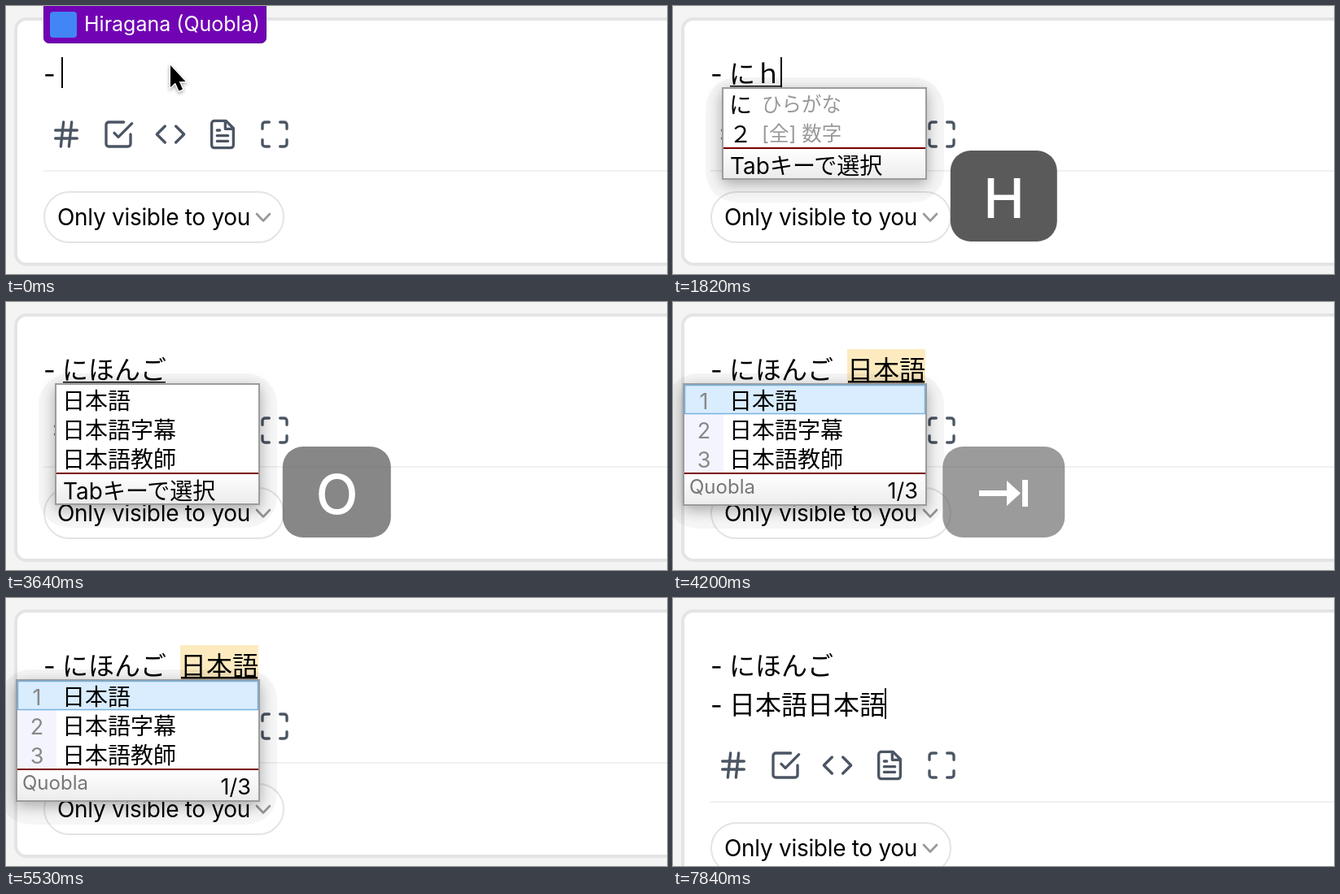
These frames come from a looping animation (812x330 px, 8000 ms). An HTML page:

```html
<!DOCTYPE html>
<html lang="ja">
<head>
<meta charset="utf-8">
<title>Kana input</title>
<style>
html, body { margin: 0; width: 100%; height: 100%; overflow: hidden; background: #f4f4f4; }
svg { display: block; width: 812px; height: 330px; }
text { font-family: Inter, 'Noto Sans CJK JP', 'Noto Sans CJK', sans-serif; }
.icons { fill: none; stroke: #4b5563; stroke-width: 2; stroke-linecap: round; stroke-linejoin: round; }
.popup { filter: drop-shadow(0 5px 9px rgba(0, 0, 0, .32)); }
.glyph { fill: none; stroke: #fff; stroke-width: 7; stroke-linejoin: round; }
</style>
</head>
<body>
<svg id="stage" viewBox="0 0 812 330">
  <defs>
    <linearGradient id="foot" x2="0" y2="1">
      <stop offset="0" stop-color="#fff"/><stop offset="1" stop-color="#ececec"/>
    </linearGradient>
  </defs>
  <rect width="812" height="330" fill="#f4f4f4"/>
  <rect id="card" x="12" y="16" width="900" height="302" rx="13" fill="#fff" stroke="#e4e4e7" stroke-width="4"/>
  <g id="lower">
    <g id="tools" class="icons"></g>
    <path d="M46 203H812" stroke="#f0f0f1" stroke-width="2"/>
    <rect x="47" y="229" width="294" height="62" rx="31" fill="#fff" stroke="#e4e4e7" stroke-width="2"/>
    <text x="63" y="270" font-size="28" letter-spacing="-.3">Only visible to you</text>
    <path d="M308 256l8 8.500 8-8.500" fill="none" stroke="#999" stroke-width="2.600" stroke-linecap="round" stroke-linejoin="round"/>
  </g>
  <g id="live"></g>
</svg>
<script>
const LOOP = 8000, TICK = 70, LINE = 48;
const CONVERT = 4200, COMMIT = 5740;

// [time, key, key width, composed text, suggestions]
const japan = ['日本', '日本語', '日本人'];
const language = ['日本語', '日本語字幕', '日本語教師'];
const two = [['に', 'ひらがな'], ['２', '[全] 数字']];
const strokes = [
  [1190, 'N', 132, 'ｎ', ['の', 'な', 'に']],
  [1470, 'I', 112, 'に', two],
  [1820, 'H', 131, 'にｈ', two],
  [1960, 'O', 133, 'にほ', japan],
  [2100, 'N', 132, 'にほｎ', japan],
  [2240, 'N', 132, 'にほん', japan],
  [2380, 'G', 131, 'にほんｇ', language],
  [2520, 'O', 133, 'にほんご', language],
  [CONVERT, 'tab', 150, 'にほんご', language],
  [COMMIT, 'enter', 154, '', []]
];

// Spans [from, to) when the caret is off
const caretOff = [[280, 770], [3150, 3710], [CONVERT, COMMIT], [6300, 6790], [7350, 7840]];

// Key overlay fades: [start, opacity per tick]
const fades = [
  [1190, [.6]], [CONVERT, [.6]], [COMMIT, [.6]],
  [3640, [.72, .46, .2, 0]], [5180, [.72, .46, .2, 0]], [6790, [.6, .25, 0]]
];
const keyHidden = [[0, 1190], [3850, CONVERT], [5390, COMMIT], [6930, LOOP]];

const icons = [
  'M4 9H20M4 15H20M10 3L8 21M16 3L14 21',
  'M9 11l3 3L22 4M21 12v7a2 2 0 0 1-2 2H5a2 2 0 0 1-2-2V5a2 2 0 0 1 2-2h11',
  'M16 18l6-6-6-6M8 6l-6 6 6 6',
  'M14.500 2H6a2 2 0 0 0-2 2v16a2 2 0 0 0 2 2h12a2 2 0 0 0 2-2V7.500ZM14 2v6h6M16 13H8M16 17H8M10 9H8',
  'M8 3H5a2 2 0 0 0-2 2v3M21 8V5a2 2 0 0 0-2-2h-3M3 16v3a2 2 0 0 0 2 2h3M16 21h3a2 2 0 0 0 2-2v-3'
];

const $ = id => document.getElementById(id);
const within = (t, spans) => spans.some(([a, b]) => t >= a && t < b);
const text = (x, y, size, str, attrs = '') =>
  `<text x="${x}" y="${y}" font-size="${size}" ${attrs}>${str}</text>`;
const rect = (x, y, w, h, fill, attrs = '') =>
  `<rect x="${x}" y="${y}" width="${w}" height="${h}" fill="${fill}" ${attrs}/>`;

$('tools').innerHTML = icons.map((d, i) =>
  `<path d="${d}" transform="translate(${54 + 64 * i} 138) scale(1.667)"/>`).join('');

function badge(t) {
  if (t >= 1190) return '';
  const alpha = Math.min(1, Math.max(.04, 1 - (t - 700) / 365));
  return `<g opacity="${alpha}">` +
    rect(46.5, -10, 273, 55.5, '#7103b4', 'rx="6" stroke="#5c0096"') +
    rect(54, 7, 33, 32, '#4285f4', 'rx="4"') +
    text(96, 31, 25, 'Hiragana (Quobla)', 'fill="#fff"') + '</g>';
}

function pointer() {
  return `<path d="M202 73V100L208 94.500L212.500 104.500L217 102.500L212.800 93H220.500Z" stroke="#fff"
    stroke-width="2.500" paint-order="stroke" style="filter:drop-shadow(0 2px 2px rgba(0,0,0,.35))"/>`;
}

function popup(rows, picking) {
  if (!rows.length) return '';
  const x = picking ? 12 : 60, w = 312 - x;
  const rule = 103 + 36 * rows.length, h = rule + (picking ? 40 : 39) - 100;
  let s = rect(x - 20, 88, w + 41, h + 40, '#000', 'rx="38" opacity=".035"');
  s += '<g class="popup">' + rect(x + 1, 101, w - 2, h - 2, '#fff', 'stroke="#9c9c9c" stroke-width="2"') + '</g>';
  s += rect(x + 2, rule, w - 4, h - rule + 98, 'url(#foot)');
  if (picking) {
    s += rect(14, 102, 48, rule - 102, '#f4f4ff');
    s += rect(14.5, 102.5, 295, 35, '#d9edff', 'stroke="#78b0dc" stroke-width="1.500"');
  }
  rows.forEach((row, i) => {
    const [word, note] = [].concat(row), y = 132 + 36 * i;
    s += text(69, y, 28, word);
    if (note) s += text(109, y - 2, 24.5, note, 'fill="#999"');
    if (picking) s += text(38, y, 27, i + 1, 'fill="#888" text-anchor="middle"');
  });
  s += rect(x + 2, rule - 1, w - 4, 2, '#7a0000');
  return s + (picking
    ? text(20, rule + 25, 24, 'Quobla', 'fill="#777"') + text(301, rule + 31, 27, '1/3', 'text-anchor="end"')
    : text(70, rule + 32, 28, 'Tabキーで選択'));
}

function keycap(t, key, w) {
  if (within(t, keyHidden)) return '';
  let alpha = 1;
  for (const [start, steps] of fades) {
    const a = steps[Math.round((t - start) / TICK)];
    if (a !== undefined) alpha = a;
  }
  const face = {
    tab: '<path class="glyph" d="M376 235.500H414M432.500 219V252"/><path fill="#fff" d="M410 220L427 235.500L410 251Z"/>',
    enter: '<path class="glyph" stroke-linecap="round" d="M408 212.500H425Q432 212.500 432 219.500V234.500Q432 241.500 425 241.500H380M395 226L379 241.500L395 257"/>'
  }[key] || text(406.5, 261, 68, key, 'fill="#fff" font-weight="500" text-anchor="middle"');
  return `<g opacity="${alpha}">` + rect(406.3 - w / 2, 178, w, 112, '#5a5a5a', 'rx="25"') + face + '</g>';
}

function editor(t, composed) {
  const done = t >= COMMIT, picking = t >= CONVERT && !done;
  let s = text(46, 95, 32, '-') + text(69, 95, 32, done ? 'にほんご' : composed);
  let end = 69 + 32 * composed.length, top = 63;
  if (picking) {
    s += rect(214, 58, 96, 43, '#fdebbf') + text(214, 95, 32, '日本語') + rect(215, 97, 94, 2.5, '#000');
  } else if (composed) {
    s += rect(70, 98, end - 71, 1.5, '#000');
  }
  if (done) {
    s += text(46, 95 + LINE, 32, '-') + text(69, 95 + LINE, 32, '日本語日本語');
    end = 69 + 32 * 6;
    top += LINE;
  }
  if (!within(t, caretOff)) s += rect(end - 1, top, 2, 38, '#000');
  return s;
}

function render(t) {
  const [, key, width, composed, rows] = strokes.filter(k => k[0] <= t).pop() || [0, '', 0, '', []];
  const shift = t >= COMMIT ? LINE : 0;
  $('card').setAttribute('height', 302 + shift);
  $('lower').setAttribute('transform', `translate(0 ${shift})`);
  $('live').innerHTML = editor(t, composed) + badge(t) + (t < 1190 ? pointer() : '') +
    popup(rows, key === 'tab') + keycap(t, key, width);
}

let last = -1;
function loop() {
  const t = Math.floor(performance.now() % LOOP / TICK) * TICK;
  if (t !== last) render(last = t);
  requestAnimationFrame(loop);
}
loop();
</script>
</body>
</html>
```
